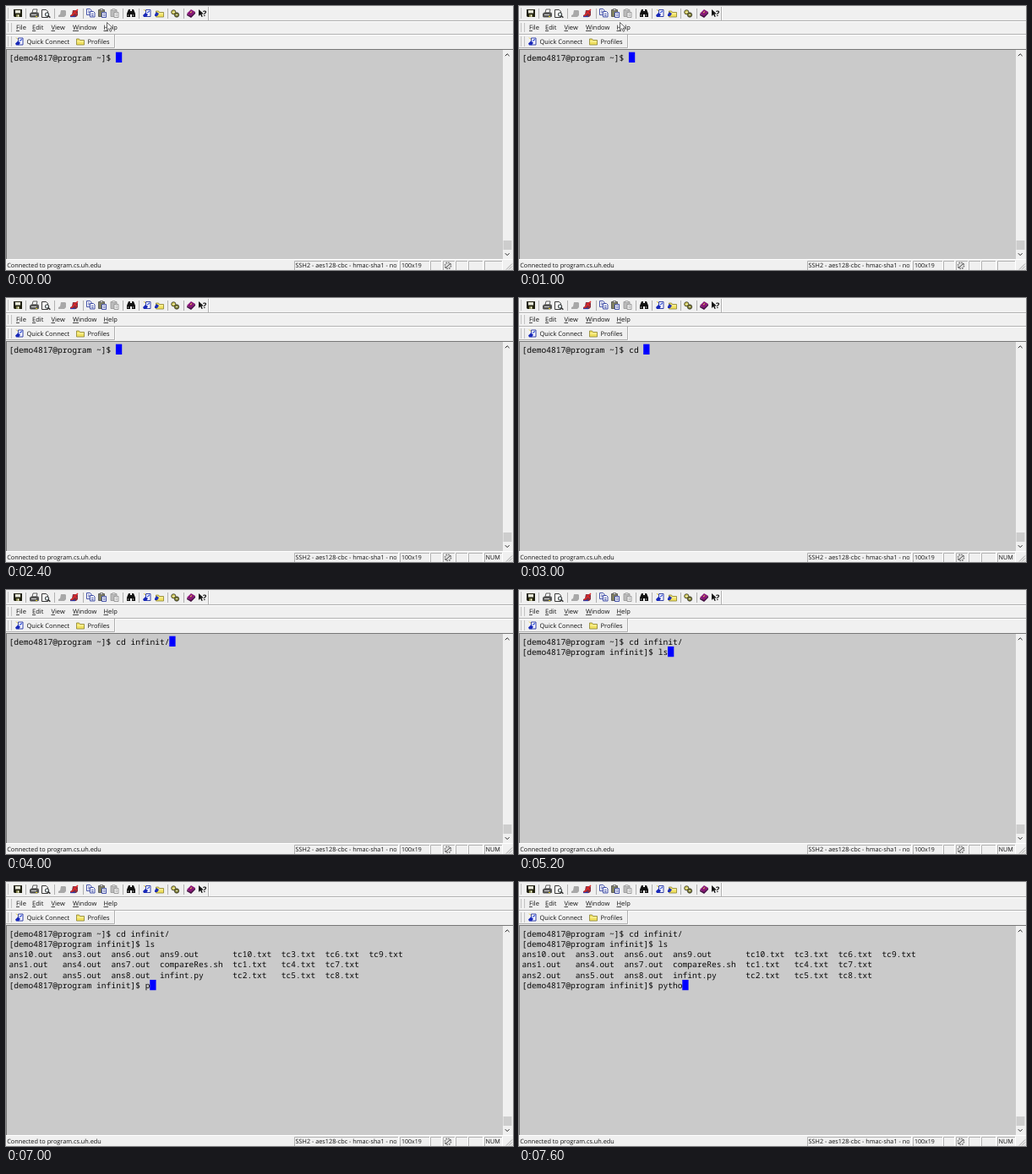
An HTML page for the animation above (8000 ms loop, 600 px wide and 313 px high).

```html
<!DOCTYPE html>
<html lang="en">
<head>
<meta charset="utf-8">
<title>Terminal session</title>
<style>
  html, body { margin: 0; width: 100%; height: 100%; overflow: hidden; background: #f0f0f0; }
  svg { display: block; width: 600px; height: 313px; }
  text { font: 7.5px "Open Sans", "Noto Sans", sans-serif; fill: #111; white-space: pre; text-rendering: geometricPrecision; }
  #term text { font: 9.6px "Noto Sans Mono", "DejaVu Sans Mono", monospace; fill: #080808; }
  .status text { font-size: 7.3px; }
  .u { text-decoration: underline; }
  .line { fill: none; stroke: #b0b0b0; }
  .light { fill: none; stroke: #fff; }
  .ink { fill: none; stroke: #222; }
</style>
</head>
<body>
<svg viewBox="0 0 600 313">
  <defs>
    <g id="link">
      <path d="M3.5 1.5h5.5v8h-5.5z" fill="#f4f4ff" stroke="#2030a0" stroke-width=".9"/>
      <path d="M0 8l3-3 3 2-2 3H1z" fill="#1828b8"/>
      <path d="M5 5l3-2" stroke="#3858d8" stroke-width="1.3"/>
      <path d="M1 1l2 2" stroke="#d8c030"/>
    </g>
    <g id="folder">
      <path d="M.5 2.5h3l1 1.5h5v5.5h-9z" fill="#f0e060" stroke="#8a8030" stroke-width=".8"/>
      <path d="M1 5.5h8" stroke="#fff8b0"/>
    </g>
    <g id="paste">
      <path d="M.5 1.5h7v8h-7z" fill="currentColor" stroke="#555" stroke-width=".9"/>
      <path d="M2.5 .5h3v2h-3z" fill="#ddd" stroke="#555" stroke-width=".7"/>
      <path d="M4.5 4.5h5v6h-5z" fill="#fff" stroke="#3040a0" stroke-width=".9"/>
      <path d="M6 6.5h2.5M6 8.5h2.5" stroke="#3040a0" stroke-width=".8"/>
    </g>
    <path id="plug" d="M3 1h5l1 1v5L7 9H0V7l2-1z" fill="currentColor"/>
  </defs>

  <rect width="600" height="313" fill="#f0f0f0"/>
  <!-- toolbar frames, grips and separators -->
  <path class="light" d="M0 18.5H600M0 34.5H600M240.5 1V17M129.5 35V50"/>
  <path class="line" d="M0 17.5H600M0 33.5H600M0 49.5H128.5V34M239.5 1V17"/>
  <path class="line" stroke-opacity=".7" d="M2.5 2V15M2.5 20V31M2.5 36V48M6.5 20V31M6.5 36V48"/>
  <path class="line" d="M23.5 3V15M57.5 3V15M91.5 3V15M138.5 3V15M157.5 3V15M191.5 3V15M210.5 3V15"/>

  <!-- toolbar icons -->
  <g transform="translate(9 4)">
    <path d="M0 0h10v9H1L0 8z" fill="#202010"/>
    <path d="M2 1h6v3.5H2z" fill="#e8e8d8"/>
    <path d="M3 6h4v3H3z" fill="#888850"/><path d="M5.5 6.5v2" stroke="#fff"/>
  </g>
  <g transform="translate(28 4)">
    <path d="M3 4l1-4h5L8 4z" fill="#fff" stroke="#333" stroke-width=".8"/>
    <path d="M0 5l2-1.5h8l1 1.5v3.5l-2 1H1L0 8.5z" fill="#555"/>
    <path d="M2 6.5h6" stroke="#ddd"/><path d="M7 8.5h2" stroke="#d8c820"/>
  </g>
  <g transform="translate(42 4)" class="ink" stroke-width=".9">
    <path d="M.5 .5h5l2 2v7h-7z" fill="#fff"/>
    <circle cx="6.5" cy="6" r="2.2" fill="#d8e8ea"/><path d="M8 7.5l2.3 2.3" stroke-width="1.4"/>
  </g>
  <use href="#plug" x="62" y="4" color="#a8a8a8"/>
  <g transform="translate(76 4)">
    <use href="#plug" color="#803040"/>
    <path d="M0 8.5h6" stroke="#2838a8" stroke-width="1.3"/>
    <path d="M1 8L9 0M4 2l4 4" stroke="#e02828" stroke-width="1.5"/>
  </g>
  <g transform="translate(95 3)" fill="#fff" stroke="#3040a0" stroke-width=".9">
    <path d="M.5 .5h4l1.5 1.5v5.5H.5z"/><path d="M2 3h2M2 5h2"/>
    <path d="M4.5 3.5h4l1.5 1.5v5H4.5z"/><path d="M6 6.5h2.5M6 8.5h2.5"/>
  </g>
  <use href="#paste" x="109" y="3" color="#808060"/>
  <g opacity=".55"><use href="#paste" x="123.5" y="3" color="#909090" style="filter:grayscale(1)"/></g>
  <g transform="translate(143 4)" fill="#111">
    <path d="M2 0h2v2h2V0h2l2 5v4H6V6H4v3H0V5z"/>
    <path d="M1.5 6v2M7.5 6v2" stroke="#aaa" stroke-width=".8"/>
  </g>
  <use href="#link" x="162" y="3"/>
  <use href="#folder" x="177" y="3.5"/>
  <path d="M176 10l2-3 3 2-2 3h-3z" fill="#2030b8"/>
  <g transform="translate(195 4)" stroke="#333" stroke-width=".8">
    <circle cx="3.3" cy="3.3" r="2.6" fill="#c8c040"/><circle cx="7" cy="6.5" r="2.7" fill="#808030"/>
    <path d="M2 3.3h3M6 6.5h2" stroke="#fff"/>
  </g>
  <g transform="translate(214 4)">
    <path d="M0 5l5-5 5 3-5 6z" fill="#8a1878"/><path d="M0 5.5l5 2.5 5-5v2l-5 5-5-3z" fill="#401040"/>
    <path d="M4 4l2-1.5" stroke="#f0d840"/>
  </g>
  <path d="M228 4v8l2-2 1.5 3 1.3-.6-1.4-3h2.6z" fill="#111"/>
  <text x="233" y="12" style="font-size:9px;font-weight:bold">?</text>

  <!-- menu and quick bar -->
  <g id="menu"></g>
  <use href="#link" x="11" y="36.5"/><text x="24.5" y="44.8">Quick Connect</text>
  <use href="#folder" x="83" y="36.5"/><text x="96.5" y="44.8">Profiles</text>

  <!-- terminal with scroll bar -->
  <rect y="51" width="588" height="249" fill="#cacaca"/>
  <path d="M0 51.5H600M.5 51V300" fill="none" stroke="#777"/>
  <rect x="588.5" y="278" width="10" height="11" fill="#cdcdcd"/>
  <path class="ink" stroke="#444" d="M590.8 59.2l2.4-2.4 2.4 2.4M590.8 293.2l2.4 2.4 2.4-2.4"/>
  <g id="term"></g>
  <rect id="cursor" width="7.3" height="12.3" fill="#0000ff"/>

  <!-- status bar -->
  <g class="status">
    <path class="light" d="M0 300.5H600"/>
    <text x="1.2" y="310.2">Connected to program.cs.uh.edu</text>
    <text x="342.5" y="310.2">SSH2 - aes128-cbc - hmac-sha1 - none</text>
    <rect x="462.5" y="301" width="137.5" height="12" fill="#f0f0f0"/>
    <text x="468" y="310.2" style="font-size:7px">100x19</text>
    <path class="line" d="M341.5 313V302.5H464M466.5 313V302.5H501M502.5 313V302.5H515M517.5 313V302.5H531M532.5 313V302.5H546M547.5 313V302.5H564M566.5 313V302.5H587"/>
    <path class="light" d="M464.5 302V313M501.5 302V313M515.5 302V313M531.5 302V313M546.5 302V313M564.5 302V313M587.5 302V313"/>
    <circle cx="523" cy="307.8" r="3.6" fill="#ddd" stroke="#777" stroke-width="1.6" stroke-dasharray="1.6 1.2"/>
    <path d="M520 311l6-6" stroke="#555"/>
    <path d="M592 312.5l7-7M595 312.5l4-4M598 312.5l1-1" stroke="#a0a0a0"/>
    <text id="num" x="567.5" y="310.2">NUM</text>
  </g>
  <path id="pointer" d="M119.5 19.5v9.2l2.2-2 1.6 3.6 1.6-.7-1.6-3.5h3z" fill="#fff" stroke="#444" stroke-width=".8"/>
</svg>
<script>
const LOOP = 8000, COL = 5.76, ROW = 12.25, LEFT = 3.5;
const $ = id => document.getElementById(id);
const addText = (parent, x, y) => {
  const el = document.createElementNS('http://www.w3.org/2000/svg', 'text');
  el.setAttribute('x', x);
  el.setAttribute('y', y);
  return parent.appendChild(el);
};

const menu = { File: 12, Edit: 31, View: 53.5, Window: 79, Help: 115.5 };
for (const [name, x] of Object.entries(menu))
  addText($('menu'), x, 28).innerHTML = `<tspan class="u">${name[0]}</tspan>${name.slice(1)}`;

const prompt = dir => `[demo4817@program ${dir}]$ `;
const listing = `ans10.out  ans3.out  ans6.out  ans9.out       tc10.txt  tc3.txt  tc6.txt  tc9.txt
ans1.out   ans4.out  ans7.out  compareRes.sh  tc1.txt   tc4.txt  tc7.txt
ans2.out   ans5.out  ans8.out  infint.py      tc2.txt   tc5.txt  tc8.txt
`;

// [time, text added to the screen]
const output = [
  [0, prompt('~')],
  [2600, 'c'], [2800, 'd'], [3000, ' '], [3200, 'i'], [3400, 'n'], [3600, 'f'], [3800, 'i'],
  [4000, 'nit/'], [4400, '\n' + prompt('infinit')],
  [5000, 'l'], [5200, 's'], [5400, '\n'], [5600, listing + prompt('infinit')],
  [7000, 'p'], [7200, 'y'], [7400, 'th'], [7600, 'o']
];
const rows = Array.from({ length: 6 }, (_, i) => addText($('term'), LEFT, 64.6 + i * ROW));
const show = (id, on) => $(id).setAttribute('visibility', on ? 'visible' : 'hidden');

let shown;
function draw(t) {
  show('pointer', t < 1400);
  show('num', t >= 1400);
  const screen = output.filter(([at]) => t >= at).map(([, text]) => text).join('');
  if (screen === shown) return;
  shown = screen;
  const lines = screen.split('\n'), last = lines.length - 1;
  rows.forEach((row, i) => row.textContent = lines[i] || '');
  $('cursor').setAttribute('x', 3.2 + lines[last].length * COL);
  $('cursor').setAttribute('y', 54.7 + last * ROW);
}

const start = performance.now();
function tick() {
  draw((performance.now() - start) % LOOP);
  requestAnimationFrame(tick);
}
tick();
</script>
</body>
</html>
```
